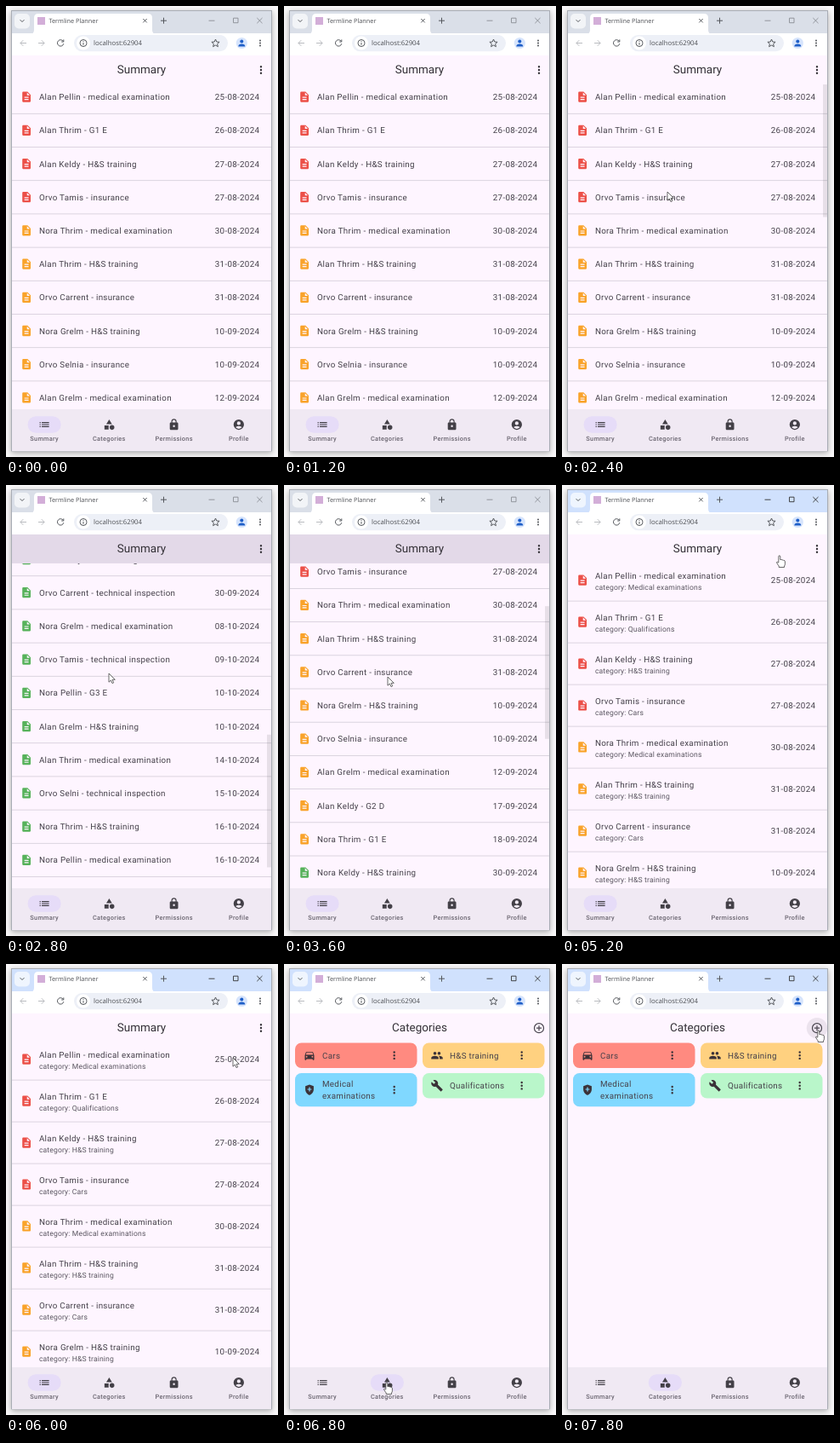
Recreate the animation shown at these times as an HTML page. Size 320 by 529 pixels, loop 8 s.

```html
<!DOCTYPE html>
<html lang="en">
<head>
<meta charset="utf-8">
<title>Deadline list</title>
<style>
html, body { margin: 0; width: 100%; height: 100%; overflow: hidden; background: #faf9fa; }
svg { display: block; width: 100vw; height: 100vh; }
text { font-family: Roboto, sans-serif; fill: #45414a; text-rendering: geometricPrecision; }
.body { font-size: 9.8px; letter-spacing: .306px; }
.sub { font-size: 8.575px; letter-spacing: .153px; fill: #5a5660; }
.title { font-size: 13.475px; fill: #343137; text-anchor: middle; }
.nav { font-size: 7.35px; letter-spacing: .306px; font-weight: 500; text-anchor: middle; fill: #6a6570; }
.menu { font-size: 8.575px; letter-spacing: .06px; font-weight: 500; fill: #58535c; }
.chrome { font-family: "Open Sans", sans-serif; fill: #4c4e53; }
.end { text-anchor: end; }
.line { fill: none; stroke: #55585d; stroke-width: 1; }
</style>
</head>
<body>
<svg id="stage" viewBox="0 0 320 529" preserveAspectRatio="none"></svg>
<script>
const LOOP = 8000, STEP = 200;
const UNIT = 0.6125;              // logical pixel of the app
const LIST_TOP = 91.9, LIST_HEIGHT = 381.1;
const TICK = 100 * UNIT;          // one notch of the wheel

const ICONS = {
  doc: 'M14 2H6c-1.1 0-2 .9-2 2v16c0 1.1.9 2 2 2h12c1.1 0 2-.9 2-2V8zM16 18H8v-2h8zM16 14H8v-2h8zM13 9V3.5L18.5 9z',
  list: 'M3 7h2v2H3zM3 11h2v2H3zM3 15h2v2H3zM7 7h14v2H7zM7 11h14v2H7zM7 15h14v2H7z',
  shapes: 'M12 2l-5.5 9h11zM3 13.5h8v8H3zM13 17.5a4.5 4.5 0 1 0 9 0a4.5 4.5 0 1 0-9 0z',
  lock: 'M18 8h-1V6A5 5 0 0 0 7 6v2H6c-1.1 0-2 .9-2 2v10c0 1.1.9 2 2 2h12c1.1 0 2-.9 2-2V10c0-1.1-.9-2-2-2zM12 17a2 2 0 1 1 0-4a2 2 0 0 1 0 4zM15.1 8H8.9V6a3.1 3.1 0 0 1 6.2 0z',
  person: 'M12 2a10 10 0 1 0 0 20a10 10 0 0 0 0-20zM12 6a3.5 3.5 0 1 1 0 7a3.5 3.5 0 0 1 0-7zM12 20c-2 0-4.4-.8-6.1-2.9a10 10 0 0 1 12.2 0C16.4 19.2 14 20 12 20z',
  car: 'M18.9 6c-.2-.6-.7-1-1.4-1h-11c-.7 0-1.2.4-1.4 1L3 12v8c0 .5.5 1 1 1h1c.5 0 1-.5 1-1v-1h12v1c0 .5.5 1 1 1h1c.5 0 1-.5 1-1v-8zM6.5 16a1.5 1.5 0 1 1 0-3a1.5 1.5 0 0 1 0 3zM17.5 16a1.5 1.5 0 1 1 0-3a1.5 1.5 0 0 1 0 3zM5 11l1.5-4.5h11L19 11z',
  people: 'M16 5a3 3 0 1 0 0 6a3 3 0 0 0 0-6zM8 5a3 3 0 1 0 0 6a3 3 0 0 0 0-6zM8 13c-2.3 0-7 1.2-7 3.5V19h14v-2.5C15 14.2 10.3 13 8 13zM16 13l-1 .1c1.2.8 2 1.9 2 3.4V19h6v-2.5c0-2.3-4.7-3.5-7-3.5z',
  health: 'M12 2L4 5v6c0 5 3.4 9.9 8 11c4.6-1.1 8-6 8-11V5zM16 12h-3v3h-2v-3H8v-2h3V7h2v3h3z',
  wrench: 'M22.7 19l-9.1-9.1c.9-2.3.4-5-1.5-6.9c-2-2-5-2.4-7.4-1.3L9 6L6 9L1.6 4.7c-1.2 2.4-.7 5.4 1.3 7.4c1.9 1.9 4.6 2.4 6.9 1.5l9.1 9.1c.4.4 1 .4 1.4 0l2.3-2.3c.5-.4.5-1.1.1-1.4z',
  dots: 'M12 4a2 2 0 1 0 0 4a2 2 0 0 0 0-4zM12 10a2 2 0 1 0 0 4a2 2 0 0 0 0-4zM12 16a2 2 0 1 0 0 4a2 2 0 0 0 0-4z',
  add: 'M13 7h-2v4H7v2h4v4h2v-4h4v-2h-4zM12 2a10 10 0 1 0 0 20a10 10 0 0 0 0-20zM12 20a8 8 0 1 1 0-16a8 8 0 0 1 0 16z'
};

const RED = '#ec5048', ORANGE = '#f9a32a', GREEN = '#57b25b';
const KINDS = {
  medical: ['medical examination', 'Medical examinations'],
  training: ['H&amp;S training', 'H&amp;S training'],
  insurance: ['insurance', 'Cars'],
  inspection: ['technical inspection', 'Cars'],
  g1e: ['G1 E', 'Qualifications'],
  g2d: ['G2 D', 'Qualifications'],
  g3e: ['G3 E', 'Qualifications']
};
const DEADLINES = [
  ['Alan Pellin', 'medical', '25-08', RED],
  ['Alan Thrim', 'g1e', '26-08', RED],
  ['Alan Keldy', 'training', '27-08', RED],
  ['Orvo Tamis', 'insurance', '27-08', RED],
  ['Nora Thrim', 'medical', '30-08', ORANGE],
  ['Alan Thrim', 'training', '31-08', ORANGE],
  ['Orvo Carrent', 'insurance', '31-08', ORANGE],
  ['Nora Grelm', 'training', '10-09', ORANGE],
  ['Orvo Selnia', 'insurance', '10-09', ORANGE],
  ['Alan Grelm', 'medical', '12-09', ORANGE],
  ['Alan Keldy', 'g2d', '17-09', ORANGE],
  ['Nora Thrim', 'g1e', '18-09', ORANGE],
  ['Nora Keldy', 'training', '30-09', GREEN],
  ['Orvo Carrent', 'inspection', '30-09', GREEN],
  ['Nora Grelm', 'medical', '08-10', GREEN],
  ['Orvo Tamis', 'inspection', '09-10', GREEN],
  ['Nora Pellin', 'g3e', '10-10', GREEN],
  ['Alan Grelm', 'training', '10-10', GREEN],
  ['Alan Thrim', 'medical', '14-10', GREEN],
  ['Orvo Selni', 'inspection', '15-10', GREEN],
  ['Nora Thrim', 'training', '16-10', GREEN],
  ['Nora Pellin', 'medical', '16-10', GREEN],
  ['Alan Keldy', 'medical', '21-10', GREEN],
  ['Orvo Carrent', 'insurance', '28-10', GREEN]
];

// [time, x, y]
const POINTER = [
  [2000, 250, 330], [2400, 124, 218], [2800, 121, 221], [3600, 122, 225], [3800, 122, 225],
  [4200, 302, 77], [4600, 302, 77], [5000, 262, 82], [5400, 250, 84], [5600, 250, 84],
  [6000, 267, 110], [6600, 121, 491], [7000, 121, 491], [7600, 300, 78], [7800, 302, 78]
];
// [time, notches]
const WHEEL = [[0, 0], [2600, 4], [2800, 8], [3000, 9], [3400, 6], [3600, 2], [3800, 0]];

const icon = (name, cx, cy, fill = '#49454f', size = 24) => {
  const k = size * UNIT / 24;
  return `<path transform="translate(${cx - 12 * k} ${cy - 12 * k}) scale(${k})" d="${ICONS[name]}" fill="${fill}" fill-rule="evenodd"/>`;
};
const text = (cls, x, y, value, extra = '') => `<text class="${cls}" x="${x}" y="${y}" ${extra}>${value}</text>`;
const rect = (x, y, w, h, fill, r = 0, extra = '') =>
  `<rect x="${x}" y="${y}" width="${w}" height="${h}" fill="${fill}" rx="${r}" ${extra}/>`;
const line = (d, extra = '') => `<path class="line" d="${d}" ${extra}/>`;

function deadlineList(detailed) {
  const tile = (detailed ? 64 : 48) * UNIT, gap = 16 * UNIT;
  return DEADLINES.map(([owner, kind, day, color], i) => {
    const top = LIST_TOP + i * (tile + gap), mid = top + tile / 2;
    const [label, category] = KINDS[kind];
    return icon('doc', 24.1, mid, color)
      + text('body', 38.9, mid + (detailed ? -1.6 : 3.5), `${owner} - ${label}`)
      + (detailed ? text('sub', 38.9, mid + 11.8, `category: ${category}`) : '')
      + text('body end', 298.3, mid + 3.5, `${day}-2024`)
      + rect(7, top + tile + gap / 2 - .3, 305.5, .8, '#d3ccd8');
  }).join('');
}

function card(x, y, h, fill, glyph, ...lines) {
  const mid = y + h / 2;
  return rect(x, y, 143.5, h, fill, 7.4)
    + icon(glyph, x + 17, mid, '#3b3238')
    + lines.map((s, i) => text('body', x + 32, mid + 3.5 + (i - (lines.length - 1) / 2) * 14.7, s)).join('')
    + icon('dots', x + 116.7, mid, '#3b3238');
}

function navItem(i, glyph, label) {
  const x = 45.1 + i * 76.25;
  return icon(glyph, x, 491, '#434047') + text('nav', x, 510.2, label);
}

const browser = `
  ${rect(6.5, 5.5, 306, 516.5, '#fff', 0, 'stroke="#a9adb5" filter="url(#windowShadow)"')}
  ${rect(7, 6, 305, 27, '#d3e2fb', 0, 'id="titleBar"')}
  ${rect(10, 9, 18, 17.5, '#fff', 5, 'opacity=".65"')}
  ${line('M16.6 16.2l2.4 2.4l2.4-2.4')}
  <path d="M28 33q5 0 5-5V14q0-5 5-5H167q5 0 5 5V28q0 5 5 5z" fill="#fff"/>
  ${rect(37, 13, 9, 9, '#d3aed8')}
  ${text('chrome', 50.5, 20, 'Termline Planner', 'font-size="7.3"')}
  ${line('M161.3 15l4.4 4.4m0-4.4l-4.4 4.4M182 17.2h7m-3.5-3.5v7')}
  <path id="controls" d="M238.5 17.2h7M267.5 14.2h5.5v5.5h-5.5zM295.3 14l6.2 6.2m0-6.2l-6.2 6.2" fill="none" stroke-width=".9"/>
  ${rect(7, 32, 305, 26, '#fff')}
  ${line('M24 43.5h-7m3.2-3.3l-3.3 3.3l3.3 3.3M38 43.5h7m-3.2-3.3l3.3 3.3l-3.3 3.3', 'style="stroke:#babcc0"')}
  ${line('M67.3 41.4A3.7 3.7 0 1 0 67.8 44.2M67.8 39.4v2.6h-2.6')}
  ${rect(80, 34, 181, 19.2, '#edf0f7', 9.6)}
  <circle cx="91" cy="43.5" r="8" fill="#fff"/>
  <circle class="line" cx="91" cy="43.5" r="4"/>
  ${line('M91 43v2.7M91 41.1v1')}
  ${text('chrome', 103, 46.1, 'localhost:62904', 'font-size="7.8"')}
  ${line('M246.5 39l1.3 3l3.3.3l-2.5 2.2l.8 3.2l-2.9-1.7l-2.9 1.7l.8-3.2l-2.5-2.2l3.3-.3z')}
  <circle cx="277.3" cy="43.5" r="6.6" fill="#d6e4fc"/>
  <circle cx="277.3" cy="41.5" r="2" fill="#1f5fc8"/>
  <path d="M273.3 47.5q0-3 4-3t4 3z" fill="#1f5fc8"/>
  ${icon('dots', 299, 43.5, '#55585d', 20)}`;

const summary = `
  <g clip-path="url(#listArea)">
    <g id="compact">${deadlineList(false)}</g>
    <g id="detailed">${deadlineList(true)}</g>
    ${rect(307, LIST_TOP, 5, 155.7, '#000', 0, 'id="thumb" opacity=".09"')}
  </g>
  ${rect(7, 58, 305, 33.9, '#e3d9e8', 0, 'id="tint"')}
  ${text('title', 159.5, 79.3, 'Summary')}
  <circle id="dotsHover" cx="300" cy="75" r="12" fill="#1d1b20" opacity=".08"/>
  ${icon('dots', 300, 75, '#38353b')}`;

const categories = `
  ${text('title', 159.5, 79.3, 'Categories')}
  <circle id="addHover" cx="300" cy="75.2" r="12.2" fill="#1d1b20" opacity=".08"/>
  ${icon('add', 300, 75.2, '#49454f')}
  ${card(13, 92.5, 29.4, '#ff8a80', 'car', 'Cars')}
  ${card(163, 92.5, 29.4, '#ffd180', 'people', 'H&amp;S training')}
  ${card(13, 128, 39.2, '#80d8ff', 'health', 'Medical', 'examinations')}
  ${card(163, 128, 29.4, '#b9f6ca', 'wrench', 'Qualifications')}`;

const menu = `
  ${rect(205, 63.4, 103, 68.2, '#efe7f1', 2.5, 'filter="url(#menuShadow)"')}
  ${rect(205, 68.2, 103, 29.4, '#e3dbe5')}
  ${text('menu', 212, 85.7, 'Show details')}
  ${text('menu', 212, 115.1, 'Show shared', 'style="fill:#b4aeb7"')}`;

document.getElementById('stage').innerHTML = `
  <defs>
    <filter id="windowShadow" x="-10%" y="-10%" width="120%" height="120%">
      <feDropShadow dx="0" dy="2" stdDeviation="3.5" flood-opacity=".33"/></filter>
    <filter id="menuShadow" x="-20%" y="-20%" width="140%" height="150%">
      <feDropShadow dx="0" dy="1.5" stdDeviation="1.5" flood-opacity=".3"/></filter>
    <clipPath id="listArea">${rect(7, LIST_TOP, 305, LIST_HEIGHT, '#000')}</clipPath>
  </defs>
  ${browser}
  ${rect(7, 58, 305, 464, '#fef5ff')}
  <g id="summary">${summary}</g>
  <g id="categories">${categories}</g>
  ${rect(7, 473, 305, 48.7, '#f0e9f3')}
  ${rect(25.5, 481.2, 39.2, 19.6, '#e6dcf8', 9.8, 'id="indicator"')}
  ${navItem(0, 'list', 'Summary')}
  ${navItem(1, 'shapes', 'Categories')}
  ${navItem(2, 'lock', 'Permissions')}
  ${navItem(3, 'person', 'Profile')}
  <g id="menu">${menu}</g>
  <g id="pointer" fill="#fff" stroke="#444" stroke-width=".8" stroke-linejoin="round">
    <path id="arrow" d="M0 0V10.2l2.4-2.2l1.6 3.6l1.7-.8l-1.6-3.5h3.2z"/>
    <path id="hand" d="M-1.2 7.5V1q0-1.2 1-1.2T.8 1v3.6q1.9-.6 2.1.4q1.7-.4 1.9.5q1.6-.2 1.6 1.2v3.1q0 1.2-.9 2.2v1.5H-.8v-1.5q-1.5-1.7-2.8-4.2q.2-1.6 2.4.3z"/>
  </g>`;

const $ = id => document.getElementById(id);
const show = (id, on) => $(id).setAttribute('display', on ? 'inline' : 'none');
const move = (id, x, y) => $(id).setAttribute('transform', `translate(${x} ${y})`);
const within = (t, from, to) => t >= from && t < to;

function pointerAt(t) {
  const next = POINTER.findIndex(p => p[0] > t);
  if (next < 0) return POINTER.at(-1).slice(1);
  if (next === 0) return POINTER[0].slice(1);
  const [t0, x0, y0] = POINTER[next - 1], [t1, x1, y1] = POINTER[next];
  const k = (t - t0) / (t1 - t0), eased = k * k * (3 - 2 * k);
  return [x0 + (x1 - x0) * eased, y0 + (y1 - y0) * eased];
}

function draw(t) {
  const content = DEADLINES.length * 64 * UNIT - 16 * UNIT;
  const maxScroll = content - LIST_HEIGHT;
  const scroll = Math.min(WHEEL.findLast(w => w[0] <= t)[1] * TICK, maxScroll);
  const onCategories = t >= 6800, detailed = t >= 5200, focused = t >= 4400;

  show('summary', !onCategories);
  show('categories', onCategories);
  show('compact', !detailed);
  show('detailed', detailed);
  move('compact', 0, -scroll);
  show('tint', scroll > 0);
  show('thumb', within(t, 2400, 4200));
  move('thumb', 0, scroll / maxScroll * (LIST_HEIGHT - 155.7));
  show('dotsHover', within(t, 4200, 4400));
  show('addHover', t >= 7600);
  show('menu', within(t, 4400, 5200));
  move('indicator', onCategories ? 76.25 : 0, 0);
  $('titleBar').setAttribute('fill', focused ? '#d0e1fd' : '#dadfe8');
  $('controls').setAttribute('stroke', focused ? '#333' : '#8b8e95');

  const hand = within(t, 4200, 5600) || within(t, 6600, 7200) || t >= 7600;
  show('pointer', t >= 2000);
  show('arrow', !hand);
  show('hand', hand);
  move('pointer', ...pointerAt(t));
}

const start = performance.now();
function tick() {
  const t = (performance.now() - start) % LOOP;
  draw(Math.floor(t / STEP) * STEP);
  requestAnimationFrame(tick);
}
tick();
</script>
</body>
</html>
```
